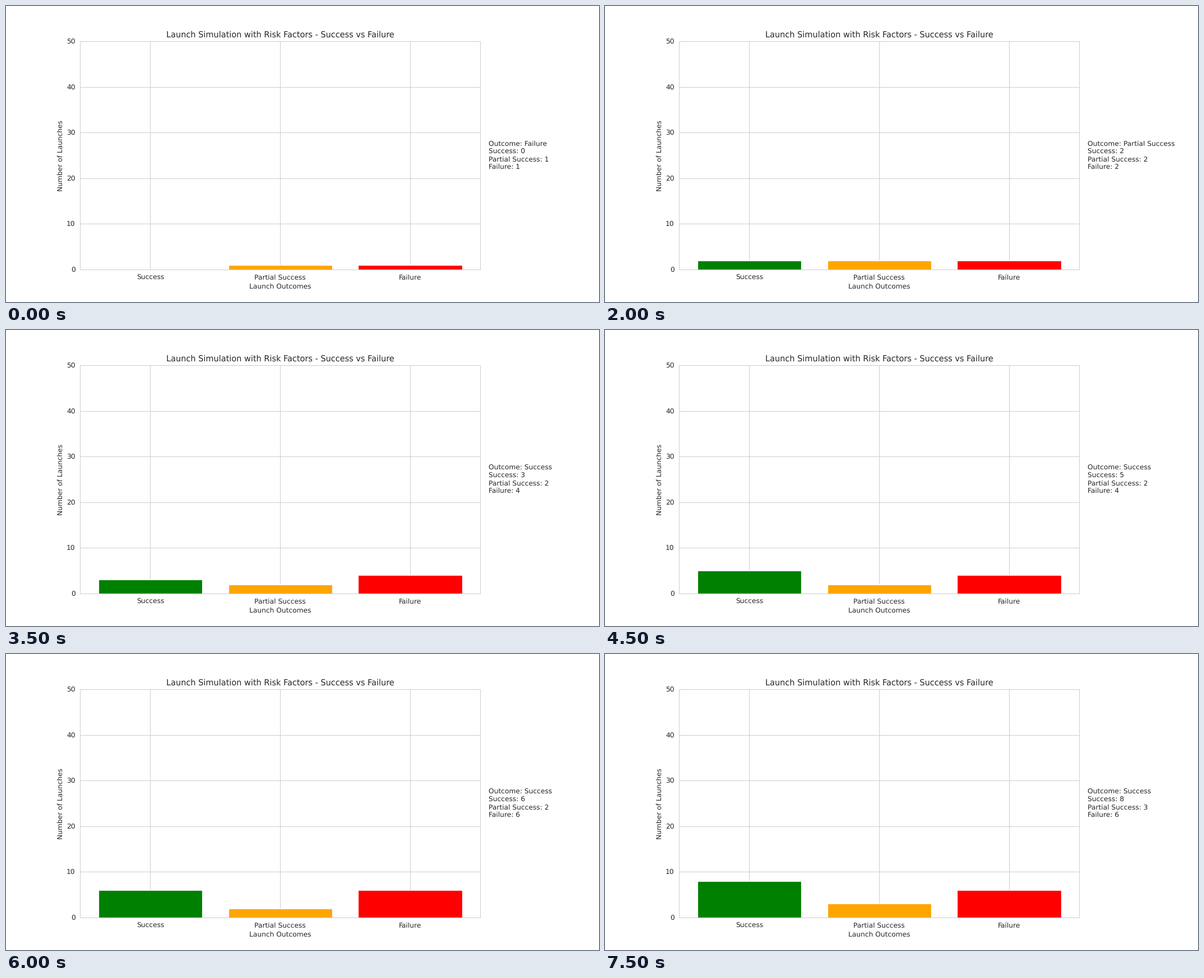
A matplotlib script for the animation above (8 s loop, 1058 by 529 pixels).

```python
import matplotlib.pyplot as plt
from matplotlib.animation import FuncAnimation

plt.rcParams.update({
    "font.family": "DejaVu Sans",
    "font.size": 10,
    "text.hinting": "none",
    "text.color": ".15",
    "axes.labelcolor": ".15",
    "axes.edgecolor": ".8",
    "axes.axisbelow": True,
    "axes.grid": True,
    "axes.titlesize": 11.9,
    "grid.color": ".8",
    "grid.linestyle": "-",
    "xtick.color": ".15",
    "ytick.color": ".15",
    "xtick.bottom": False,
    "ytick.left": False,
})

STEP_MS = 500
LABELS = {"S": "Success", "P": "Partial Success", "F": "Failure"}
COLORS = ["green", "orange", "red"]
EARLIER = "P"                   # launches before the loop starts
OUTCOMES = "FSSFPFFSSSFFSSPS"   # one launch per step

fig, ax = plt.subplots(figsize=(12, 6), dpi=1058 / 12)
fig.subplots_adjust(left=0.125, right=0.8, bottom=0.11, top=0.88)

bars = ax.bar(list(LABELS.values()), [0, 0, 0], color=COLORS,
              edgecolor="white", linewidth=1)
ax.set_ylim(0, 50)
ax.set_title("Launch Simulation with Risk Factors - Success vs Failure")
ax.set_xlabel("Launch Outcomes")
ax.set_ylabel("Number of Launches")
status = ax.text(1.02, 0.5, "", transform=ax.transAxes, va="center",
                 linespacing=1.24)


def update(step):
    launches = EARLIER + OUTCOMES[:step + 1]
    counts = [launches.count(key) for key in LABELS]
    for bar, count in zip(bars, counts):
        bar.set_height(count)
    lines = [f"Outcome: {LABELS[launches[-1]]}"]
    lines += [f"{name}: {n}" for name, n in zip(LABELS.values(), counts)]
    status.set_text("\n".join(lines))
    return [*bars, status]


def reset():
    return update(0)


anim = FuncAnimation(fig, update, frames=len(OUTCOMES), init_func=reset,
                     interval=STEP_MS, repeat=True, repeat_delay=0)
plt.show()
```
